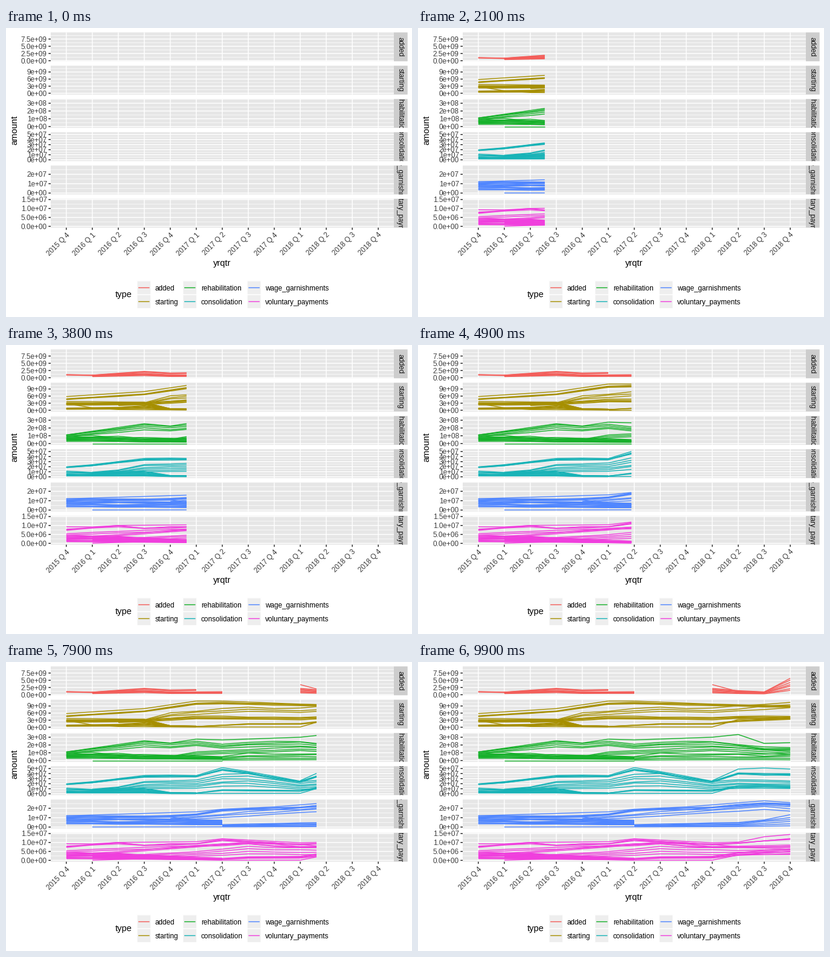
These frames come from a looping animation (672 px wide and 480 px high, 10000 ms). A matplotlib script:

```python
import numpy as np
import matplotlib.pyplot as plt
from matplotlib.animation import FuncAnimation
from matplotlib.collections import LineCollection
from matplotlib.patches import Rectangle

W, H, DPI = 672, 480, 96
FRAMES, STEP_MS = 100, 100
LEFT, RIGHT, STRIP_END = 74, 642, 664.67
TOP, PANEL_H, PITCH = 7.33, 47.94, 55.27
X0, DX, QUARTERS = 99.8, 43.03, 13
SMALL, BIG = 8.8, 11
LW = 1.067

plt.rcParams["font.family"] = "Liberation Sans"
rng = np.random.default_rng(7)


def fan(n, low, *knots, wobble=0.025):
    """n series sharing one trend, scaled from 1 down to low."""
    kx, ky = zip(*knots)
    q = np.arange(kx[0], kx[-1] + 1)
    trend = np.interp(q, kx, ky)
    return [(q, f * trend * (1 + wobble * rng.normal(size=len(q))))
            for f in np.linspace(1, low, n)]


def one(*knots):
    return fan(1, 1, *knots, wobble=0)


added = (
    fan(3, .85, (0, 1.1), (1, .9), (3, 2.25), (4, 1.65), (5, 1.8))
    + fan(5, .45, (1, .9), (3, 1.6), (4, 1), (6, 1.05))
    + one((9, 3.5), (10, 1.1), (11, .95), (12, 5.7))
    + fan(6, .3, (9, 2.2), (10, 1.4), (11, 1), (12, 5))
)
starting = (
    one((0, 5.8), (3, 7.9), (5, 11.1), (6, 11.1), (9, 9.8), (12, 9))
    + fan(3, .95, (0, 4.8), (3, 6.9), (5, 10.2), (6, 10.5), (12, 8.9), wobble=.008)
    + fan(3, .8, (3, 3.3), (4, 6), (6, 7.8), (7, 8.5), (9, 7.9), (12, 10.6))
    + fan(4, .75, (2, 2.6), (3, 3.2), (5, 4.7), (9, 4.2), (10, 4.8), (12, 4.6))
    + one((0, 3.7), (3, 3.4), (4, .5), (5, .3))
    + fan(6, .72, (0, 3.1), (3, 3.3), (4, .7), (5, .5))
    + one((0, 2.9), (1, 1), (2, .3), (5, .1))
    + fan(5, .4, (0, 1), (2, 1.2), (3, 2), (4, .6), (5, .4))
    + fan(3, .85, (5, .3), (6, .9), (7, 1.5), (9, 1.5), (10, 2.8), (12, 4))
    + one((5, .1), (9, .1), (10, 3.3), (12, 4.4))
)
rehab = (
    one((0, 1.1), (3, 2.55), (4, 2.25), (5, 2.75), (6, 2.65), (9, 3),
        (10, 3.35), (11, 2.2), (12, 2.3))
    + fan(4, .76, (0, 1.1), (3, 2.4), (4, 2.1), (5, 2.5), (6, 2.1), (7, 2.4),
          (9, 2.5), (11, 1.7), (12, 1.7))
    + fan(3, .7, (3, .6), (4, .55), (5, 1.1), (8, 1.6), (9, 1.8), (12, 1.1))
    + fan(10, .3, (0, 1), (1, 1), (3, .7), (6, .5), wobble=.08)
    + one((1, 0), (6, 0))
    + fan(5, .1, (6, .5), (7, .85), (9, .95), (12, .9), wobble=.08)
)
consolidation = (
    fan(4, .9, (0, 2), (1, 2.4), (3, 3.7), (5, 3.7), (6, 5.1), (7, 4.4),
        (9, 2.5), (10, 4.2), (12, 4))
    + one((9, 2.6), (10, 4.9), (11, 5.1), (12, 4.9))
    + fan(6, .4, (1, .9), (2, 1.4), (3, 2.5), (5, 2.65), (6, 3.9), (7, 4),
          (9, 2.3), (10, 2.8), (12, 2.6))
    + fan(9, .15, (0, 1.1), (1, .9), (3, 1.1), (4, .25), (5, .2), wobble=.06)
    + fan(3, .8, (5, .15), (6, .8), (9, .65), (10, 1.6), (12, 1.4))
    + one((5, .05), (9, .1), (10, 1.6), (12, 1.7))
)
wage = (
    one((0, 1.2), (5, 1.62), (6, 1.9), (8, 2.15), (11, 2.8), (12, 2.6))
    + fan(4, .9, (0, 1.15), (4, 1.2), (5, 1.4), (6, 1.88), (9, 2.15),
          (11, 2.65), (12, 2.5))
    + fan(3, .75, (4, .9), (6, 1.4), (8, 1.85), (11, 2.5), (12, 2.3))
    + fan(12, .3, (0, 1.05), (3, 1), (6, .75), wobble=.06)
    + one((1, .01), (6, .03))
    + fan(6, .1, (6, .25), (10, .5), (12, 1.25), wobble=.06)
)
voluntary = (
    one((0, 9.3), (1, 9.2), (2, 10), (5, 10.4), (6, 12.1), (9, 9.8),
        (10, 10.2), (11, 13.2), (12, 14.5))
    + fan(3, .95, (0, 7.8), (2, 9.8), (3, 8.7), (5, 9.6), (6, 11.5),
          (9, 9), (10, 9.8), (12, 12.5))
    + fan(2, .9, (0, 5.4), (3, 7.3), (5, 8.4), (7, 10.2), (9, 7.8), (12, 8.5))
    + fan(2, .9, (1, 3.8), (3, 5.9), (4, 7.4), (7, 10), (9, 8.5), (12, 7))
    + fan(4, .45, (1, 3.2), (3, 3.2), (5, 5), (7, 8), (9, 7), (12, 7.5))
    + fan(12, .2, (0, 4.7), (2, 3.8), (4, 2.4), (6, 1.2), wobble=.06)
    + one((1, .1), (3, .9), (6, .1))
    + fan(4, .6, (6, 1), (7, 2), (9, 2.2), (10, 4.5), (12, 6.5))
    + one((6, .1), (9, .1), (10, 3), (12, 5))
)

# name, colour, series, unit, pixels per unit, tick step, ticks, label format
PANELS = [
    ("added", "#F35E5A", added, 1e9, 4.8, 2.5, 4, ".1e"),
    ("starting", "#A68F00", starting, 1e9, 3.92, 3, 4, ".0e"),
    ("rehabilitation", "#17B12B", rehab, 1e8, 12.9, 1, 4, ".0e"),
    ("consolidation", "#18B3B7", consolidation, 1e7, 8.4, 1, 6, ".0e"),
    ("wage_garnishments", "#5086FF", wage, 1e7, 15.6, 1, 3, ".0e"),
    ("voluntary_payments", "#F03FDD", voluntary, 1e6, 2.97, 5, 4, ".1e"),
]

fig = plt.figure(figsize=(W / DPI, H / DPI), dpi=DPI, facecolor="white")
ax = fig.add_axes([0, 0, 1, 1])
ax.set(xlim=(0, W), ylim=(H, 0))
ax.axis("off")


def box(x, y, w, h, color, edge="none", lw=0):
    return ax.add_patch(Rectangle((x, y), w, h, fc=color, ec=edge, lw=lw,
                                  snap=False, zorder=1))


def rule(xs, ys, color, lw=LW):
    ax.plot(xs, ys, color=color, lw=lw, snap=False, zorder=2,
            solid_capstyle="butt")


def label(x, y, text, size=SMALL, color="black", ha="left", angle=0):
    return ax.text(x, y, text, size=size, color=color, ha=ha, va="baseline",
                   rotation=angle, rotation_mode="anchor", zorder=4)


def draw_panel(i, name, unit, scale, step, ticks, fmt):
    top = TOP + i * PITCH
    bottom = top + PANEL_H
    zero = bottom - (0.9 if i == 0 else 2.18)
    box(LEFT, top, RIGHT - LEFT, PANEL_H, "#E6E6E6")
    strip = box(RIGHT, top, STRIP_END - RIGHT, PANEL_H, "#CDCDCD")

    for y in np.arange(zero - scale * step / 2, top, -scale * step):
        rule([LEFT, RIGHT], [y, y], "white", LW / 2)
    for q in range(QUARTERS):
        x = X0 + q * DX
        rule([x, x], [top, bottom], "white")
    for k in range(ticks):
        y = zero - scale * step * k
        rule([LEFT, RIGHT], [y, y], "white")
        rule([LEFT - 3.67, LEFT], [y, y], "#222222")
        label(67.8, y + 4.2, format(k * step * unit, fmt), color="#3C3C3C",
              ha="right")

    title = label(649.2, top + PANEL_H / 2, name, color="#111111",
                  ha="center", angle=-90)
    title.set_clip_on(True)
    title.set_clip_path(strip)
    return zero


def draw_legend():
    label(181, 447.5, "type", BIG)
    size = 23.04
    for i, (name, color, *_) in enumerate(PANELS):
        x = (228.3, 304.3, 410.6)[i // 2]
        y = 431.4 + (i % 2) * size
        box(x - size / 2, y - size / 2, size, size, "#EEEEEE", "white", LW)
        rule([x - 9.2, x + 9.2], [y, y], color)
        label(x + 18.6, y + 4.2, name)


curves = []
for i, (name, color, series, unit, scale, step, ticks, fmt) in enumerate(PANELS):
    zero = draw_panel(i, name, unit, scale, step, ticks, fmt)
    lines = [(q, zero - scale * v) for q, v in series]
    art = LineCollection([], colors=color, linewidths=LW, capstyle="butt",
                         joinstyle="round", zorder=3)
    ax.add_collection(art, autolim=False)
    curves.append((art, lines))

for q in range(QUARTERS):
    x = X0 + q * DX
    rule([x, x], [331.6, 335.27], "#222222")
    label(x + 5.9, 344.1, f"{2015 + (q + 3) // 4} Q {(q + 3) % 4 + 1}",
          color="#3C3C3C", ha="right", angle=45)
label(358, 394.5, "yrqtr", BIG, ha="center")
label(18, 169.5, "amount", BIG, ha="center", angle=90)
draw_legend()

# each quarter is reached on a whole frame
KEY_FRAMES = np.round(np.linspace(0, FRAMES - 1, QUARTERS))


def reveal(q, y, pos):
    """The part of a polyline left of pos, in pixels."""
    end = min(pos, q[-1])
    keep = q < end
    xs = np.append(q[keep], end)
    ys = np.append(y[keep], np.interp(end, q, y))
    return np.column_stack([X0 + DX * xs, ys])


def update(frame):
    pos = np.interp(frame, KEY_FRAMES, np.arange(QUARTERS))
    for art, lines in curves:
        art.set_segments([reveal(q, y, pos) for q, y in lines if q[0] < pos])
    return [art for art, _ in curves]


anim = FuncAnimation(fig, update, frames=FRAMES, interval=STEP_MS,
                     repeat=True, repeat_delay=0)
plt.show()
```
